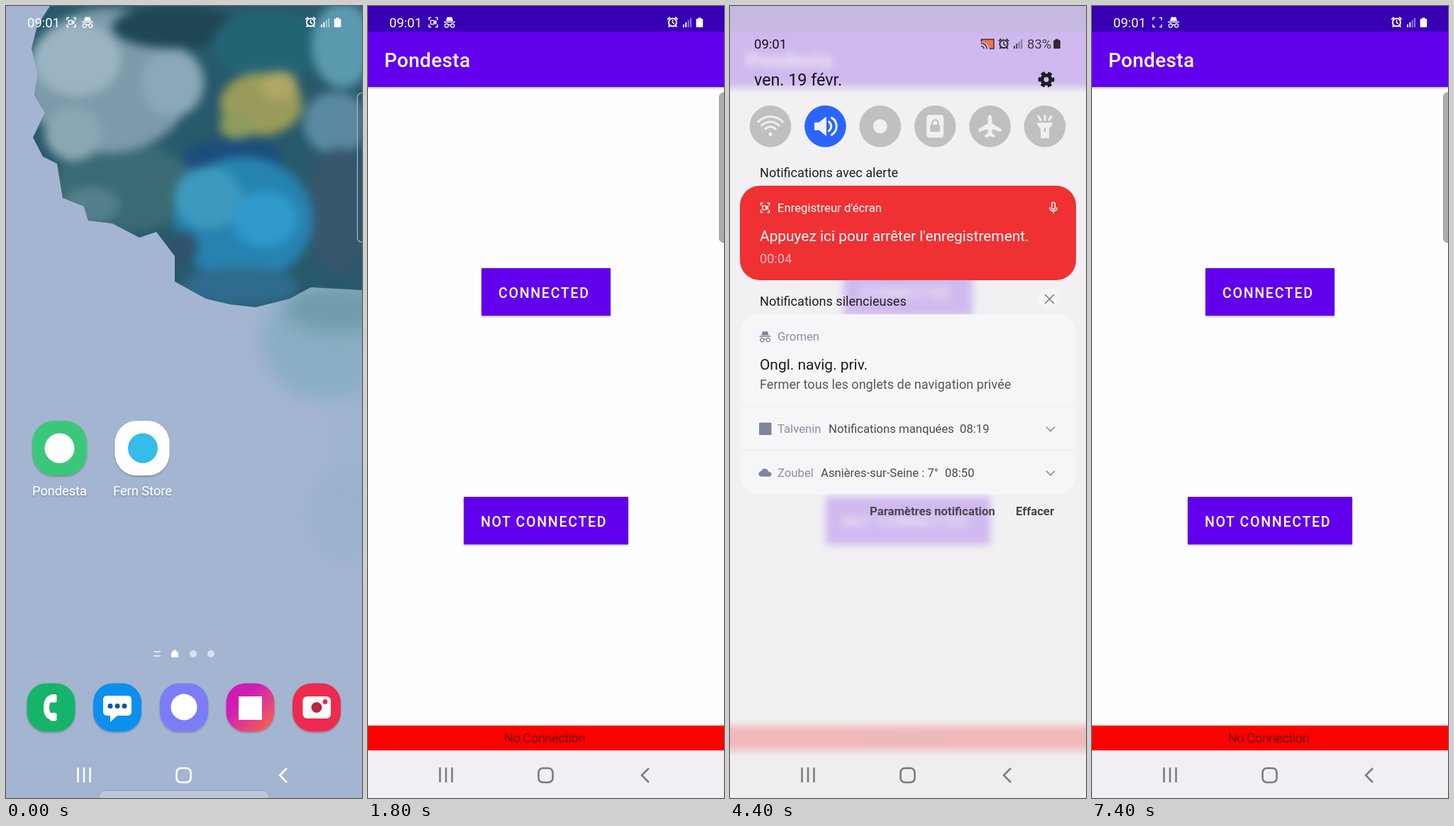
Animation of 502 by 1115 pixels, one loop 8 s. Source, as an HTML page:

```html
<!DOCTYPE html>
<html lang="fr">
<head>
<meta charset="utf-8">
<title>Pondesta</title>
<style>
html, body { margin: 0; width: 100%; height: 100%; overflow: hidden; background: #a4b5d1; }
svg { display: block; width: 502px; height: 1115px; font-family: Roboto, "Noto Sans", sans-serif; }
</style>
</head>
<body>
<svg id="stage" viewBox="0 0 502 1115" xmlns="http://www.w3.org/2000/svg"></svg>
<script>
const LOOP = 8000, STEP = 200;
const GREY = '#c2bfc2', BLUE = '#2a65ff', ICON = '#f0eff1';

// ---- markup helpers ----
const text = (x, y, size, fill, str, extra = '') =>
  `<text x="${x}" y="${y}" font-size="${size}" fill="${fill}" ${extra}>${str}</text>`;
const rect = (x, y, w, h, fill, r = 0, extra = '') =>
  `<rect x="${x}" y="${y}" width="${w}" height="${h}" rx="${r}" fill="${fill}" ${extra}/>`;
const circle = (x, y, r, fill, extra = '') =>
  `<circle cx="${x}" cy="${y}" r="${r}" fill="${fill}" ${extra}/>`;
const path = (d, fill, extra = '') => `<path d="${d}" fill="${fill}" ${extra}/>`;
const line = (d, color, w, extra = '') =>
  `<path d="${d}" fill="none" stroke="${color}" stroke-width="${w}" ${extra}/>`;
const at = (x, y, body, extra = '') => `<g transform="translate(${x} ${y})" ${extra}>${body}</g>`;
const group = (id, body, extra = '') => `<g id="${id}" ${extra}>${body}</g>`;
const blob = (x, y, rx, ry, fill, o = 1) =>
  `<ellipse cx="${x}" cy="${y}" rx="${rx}" ry="${ry}" fill="${fill}" opacity="${o}"/>`;

// ---- small icons, drawn around 0,0 ----
const brackets = c => line('M-6 -3V-6.5H-3M3 -6.5H6V-3M6 3V6.5H3M-3 6.5H-6V3', c, 1.4);
const cam = c => line('M-3.6 -2.6H1.2V2.6H-3.6ZM1.2 0L3.8 -2V2Z', c, 1.3);
const hat = c => path('M-5 -2L-3.6 -7Q-3 -8 0 -7.2Q3 -8 3.6 -7L5 -2ZM-8 -1.2H8V.3H-8Z', c) +
  line('M-6.8 4.6a2.6 2.6 0 1 0 5.2 0a2.6 2.6 0 1 0 -5.2 0M1.6 4.6a2.6 2.6 0 1 0 5.2 0a2.6 2.6 0 1 0 -5.2 0M-1.6 4Q0 3 1.6 4', c, 1.3);
const alarm = c => circle(0, 0.5, 5.6, 'none', `stroke="${c}" stroke-width="2"`) +
  line('M-7.2 -3.6L-3.6 -6.8M7.2 -3.6L3.6 -6.8M-4 5L-5.8 7M4 5L5.8 7', c, 1.9) +
  line('M0 -3V1L2.6 2.4', c, 1.5);
const signal = c => [0, 1, 2, 3].map(i =>
  rect(-6 + i * 3.4, 3 - i * 3, 1.9, 4 + i * 3, c, 0, `opacity="${i < 2 ? 1 : .5}"`)).join('');
const battery = c => rect(-4.8, -5.5, 9.6, 12, c, 1.2) + rect(-2.2, -7, 4.4, 2, c);
const mic = c => rect(-2.3, -7.5, 4.6, 9.5, 'none', 2.3, `stroke="${c}" stroke-width="1.5"`) +
  line('M-5.2 -.5Q-5.2 4.6 0 4.6Q5.2 4.6 5.2 -.5M0 4.6V8', c, 1.5);
const cast = () => path('M-8.5 -6.5H9V6.5H2A10 10 0 0 0 -8.5 -3Z', '#f0714e') +
  line('M-8.5 -3V-6.5H9V6.5H3', '#3a3a3c', 1.6) +
  line('M-9 -1A7.5 7.5 0 0 1 -1 6.8M-9 3A4 4 0 0 1 -5 6.8', '#3a3a3c', 1.6);
const gear = c => circle(0, 0, 6, 'none', `stroke="${c}" stroke-width="5"`) +
  circle(0, 0, 9.2, 'none', `stroke="${c}" stroke-width="4.4" stroke-dasharray="5.6 4.03" stroke-dashoffset="2.8"`);
const chevron = 'M-6 -3L0 3L6 -3';

const arc = r => { const d = r * .72; return `M${-d} ${11 - d}A${r} ${r} 0 0 1 ${d} ${11 - d}`; };
const tileIcons = [
  line(arc(24) + arc(17) + arc(10), ICON, 3, 'stroke-linecap="round"') + circle(0, 11, 2.6, ICON),
  path('M-15 -5H-9L1 -13V13L-9 5H-15Z', ICON, `stroke="${ICON}" stroke-linejoin="round"`) +
    line('M5 -6.5A8 8 0 0 1 5 6.5M9 -12A14 14 0 0 1 9 12', ICON, 3, 'stroke-linecap="round"'),
  circle(0, 0, 10, ICON),
  rect(-12, -16, 24, 32, ICON, 4) + rect(-7, -2, 14, 10, GREY, 1.5) + line('M-4 -2V-5A4 4 0 0 1 4 -5V-2', GREY, 2.4),
  path('M0 -16Q3 -15 3 -11V-4L16 4V8L3 4V10L7 13V16L0 14L-7 16V13L-3 10V4L-16 8V4L-3 -4V-11Q-3 -15 0 -16Z', ICON),
  path('M-11 -5H11Q10 0 6 3V17H-6V3Q-10 0 -11 -5Z', ICON) + rect(-1.3, 2, 2.6, 6, GREY, 1.3) +
    line('M0 -9V-15M-6 -9L-9 -14M6 -9L9 -14', ICON, 3, 'stroke-linecap="round"')
];

// ---- layers ----
const foliage = 'M62 0L44 28L36 60L45 95L40 125L55 150L38 185L52 212L72 222L80 270L110 282L116 302L150 306L188 326L212 318L238 352L238 388L282 412L316 420L352 424L400 412L430 396L502 400V0Z';
const wallpaper = rect(0, 0, 502, 1115, '#a4b5d1') +
  `<g filter="url(#mist)">` +
  blob(452, 470, 92, 84, '#8aaec3') + blob(470, 425, 78, 34, '#6b98a8', .8) +
  blob(500, 620, 45, 75, '#9db3cf', .8) + blob(478, 715, 54, 66, '#98b0cb', .75) + '</g>' +
  `<g clip-path="url(#leafClip)">` + rect(0, 0, 502, 440, '#28596b') + `<g filter="url(#soft)">` +
  blob(165, 255, 100, 65, '#3a6a74') + blob(120, 280, 40, 26, '#547f8b') +
  blob(145, 105, 118, 102, '#7c9aa9') + blob(100, 75, 62, 52, '#9bb4c2') + blob(235, 108, 44, 48, '#8aa8b7') + blob(95, 180, 40, 38, '#8ba7b4') +
  blob(240, 30, 90, 30, '#1f4653') + blob(370, 55, 80, 48, '#236474') +
  blob(475, 55, 44, 60, '#5b9aae') + blob(465, 165, 46, 44, '#5a89a1') +
  blob(360, 138, 58, 44, '#9a9b5b') + blob(385, 112, 26, 20, '#b1a765') + blob(325, 168, 24, 20, '#8d9c5c') +
  blob(320, 215, 70, 28, '#1c4c7c') + blob(470, 290, 48, 90, '#36566c') +
  blob(335, 300, 98, 88, '#2683b0') + blob(285, 270, 48, 44, '#3d99bd') + blob(365, 300, 46, 40, '#2f9acb') +
  blob(330, 395, 82, 28, '#2f6b8c') + blob(250, 340, 20, 24, '#31516c') +
  '</g></g>';

const squircle = (cx, cy, s, fill) => rect(cx - s / 2, cy - s / 2, s, s, fill, s * .4, 'filter="url(#lift)"');
const label = (x, str) => text(x, 689, 18.2, '#fff', str, 'text-anchor="middle" filter="url(#lift)"');
const home =
  squircle(75.5, 622.5, 77, '#3ac77a') + circle(75.5, 622.5, 21, '#fff') + label(75.5, 'Pondesta') +
  squircle(192, 622.5, 77, '#fefefe') + circle(193, 622.5, 21, '#35bce8') + label(192.5, 'Fern Store') +
  line('M208 909H218M208 915H218', '#fff', 1.8, 'opacity=".65"') +
  path('M238 906L243 910.5V917H233V910.5Z', '#fff') +
  circle(264, 912, 5, '#fff', 'opacity=".6"') + circle(289, 912, 5, '#fff', 'opacity=".6"') +
  squircle(63.5, 987.5, 68, '#17b36a') +
  line('M69 973Q57 973 57 987.5Q57 1002 69 1002', '#fff', 8) + rect(62, 969, 9.5, 11.5, '#fff', 2.5) + rect(62, 995, 9.5, 11.5, '#fff', 2.5) +
  squircle(157, 987.5, 68, '#0d8fee') + rect(137, 971, 40, 28, '#fff', 5) + path('M147 997V1008L158 998Z', '#fff') +
  [147, 157, 167].map(x => circle(x, 985.5, 3.5, '#14549c')).join('') +
  squircle(251, 987.5, 68, '#7c7df6') + circle(251, 987, 18.5, '#fff') +
  squircle(344.5, 987.5, 68, 'url(#shop)') + rect(328, 972, 33, 33, '#fff') +
  squircle(438, 987.5, 68, '#ee2a4f') + rect(418.5, 972, 39.5, 31, '#fff', 6) +
  circle(438, 987.5, 7.5, '#b8263d') + circle(450, 979.5, 3.4, '#ee2a4f') +
  rect(130.5, 1104.5, 241, 30, '#c3cddd', 9, 'opacity=".75" stroke="#8793a8"') +
  rect(495.5, 122.5, 20, 210, '#33526a', 6, 'fill-opacity=".3" stroke="#a9b8c4" stroke-width="1.2"');

const button = (x, y, w, str) => rect(x, y, w, 67, '#6200ee', 1, 'filter="url(#lift)"') +
  text(x + 24, y + 41.5, 19.5, '#fff', str, 'font-weight="500" letter-spacing="1.74"');
const app = rect(-40, -40, 582, 1200, '#fefdff') +
  rect(-40, 36, 582, 78, '#6200ee', 0, 'filter="url(#lift)"') + rect(-40, -40, 582, 76, '#3700b3') +
  text(23, 86, 27.9, '#fff', 'Pondesta', 'font-weight="500" letter-spacing=".35"') +
  button(160, 369, 182, 'CONNECTED') + button(135, 691, 232, 'NOT CONNECTED') +
  rect(-40, 1048, 582, 110, '#f1eff3') +
  group('bar', rect(-40, 1013, 582, 35, '#ff0000') +
    text(249, 1037, 18.5, '#750000', 'No Connection', 'text-anchor="middle" letter-spacing="-.6"')) +
  group('edge', rect(495.5, 122, 20, 211, '#acacac', 6, 'stroke="#9c9c9c"'));

const status = text(30, 30, 18.5, '#fff', '09:01') +
  at(92, 23, brackets('#fff') + group('recDot', cam('#fff'))) + at(115, 23, hat('#fff')) +
  at(429.5, 22.5, alarm('#fff')) + at(450, 23, signal('#fff')) + at(467.5, 23.5, battery('#fff'));

const header = text(34, 60, 18.5, '#151515', '09:01') + at(363, 53.5, cast()) +
  at(386, 53, alarm('#2b2b2d')) + at(406, 53, signal('#3a3a3c')) +
  text(419, 60, 18.5, '#3a3a3c', '83%') + at(461, 53.5, battery('#2b2b2d')) +
  text(34, 112, 23.3, '#151515', 'ven. 19 févr.') + at(446, 103.5, gear('#1e1e20'));

const tiles = tileIcons.map((icon, i) =>
  at(57 + i * 77.4, 166, circle(0, 0, 29.3, i === 1 ? BLUE : GREY, `id="tile${i}"`) + icon)).join('');

const row = (y, name, x, msg, x2, hour) => text(67, y, 16.7, '#8b8fa3', name) +
  text(x, y, 16.7, '#4b4b50', msg) + text(x2, y, 16.7, '#4b4b50', hour) +
  at(452, y - 5.5, line(chevron, '#8a8a90', 1.6));
const silent = text(42, 414, 18.1, '#1f1f21', 'Notifications silencieuses') +
  circle(450.5, 404.5, 15, '#f5f4f6') + at(450.5, 404.5, line('M-6.5 -6.5L6.5 6.5M6.5 -6.5L-6.5 6.5', '#77777b', 1.5)) +
  rect(14, 426, 474, 253, '#f6f5f8', 28) +
  at(49.5, 457.5, hat('#7f859c')) + text(67, 463, 16.7, '#8b8fa3', 'Gromen') +
  text(42, 504, 20.9, '#1c1c1e', 'Ongl. navig. priv.') +
  text(42, 531, 18.1, '#57575b', 'Fermer tous les onglets de navigation privée') +
  line('M14 556H488M14 617.5H488', '#edebef', 1.2) +
  rect(41, 578.5, 17.5, 17.5, '#7f859c', 1) + row(593, 'Talvenin', 139, 'Notifications manquées', 324, '08:19') +
  path('M44 654.5Q40 654 40.5 650Q41 647 44.5 646.5Q46 642.5 50 643.5Q53.5 644 54 647.5Q58.5 648 58.5 651.5Q58 654.5 55 654.5Z', '#7f859c') +
  row(655, 'Zoubel', 128, 'Asnières-sur-Seine : 7°', 303, '08:50') +
  text(197, 709, 16.7, '#48484c', 'Paramètres notification', 'font-weight="600"') +
  text(403, 709, 16.7, '#48484c', 'Effacer', 'font-weight="600"');

const card = rect(14, 245, 474, 133, '#ef3133', 28, 'id="cardBox"') +
  group('cardHead', text(67, 282, 16.7, '#fff', "Enregistreur d'écran") + at(456, 276, mic('#fff'))) +
  group('cardBody', at(49.5, 276, brackets('#fff') + cam('#fff')) +
    text(42, 323, 20.9, '#fff', "Appuyez ici pour arrêter l'enregistrement.") +
    text(42, 354, 18.1, '#fff', '00:04', 'id="clock" opacity=".68"'));

const nav = line('M101.5 1072V1093M110 1072V1093M118.5 1072V1093', 'currentColor', 2.5) +
  rect(240.5, 1073, 20, 20, 'none', 6, 'stroke="currentColor" stroke-width="2.6"') +
  line('M396 1073L386 1083L396 1093', 'currentColor', 2.5);

const blurFilter = (id, sd) => `<filter id="${id}" filterUnits="userSpaceOnUse" x="-40" y="-40" width="582" height="1195" color-interpolation-filters="sRGB"><feGaussianBlur stdDeviation="${sd}"/></filter>`;
document.getElementById('stage').innerHTML = `<defs>
  ${blurFilter('mist', 13)}${blurFilter('soft', 7)}${blurFilter('blur', 0)}
  <filter id="lift" x="-10%" y="-20%" width="120%" height="150%"><feDropShadow dx="0" dy="1.5" stdDeviation="1.2" flood-color="#000" flood-opacity=".28"/></filter>
  <clipPath id="leafClip">${path(foliage, '#000')}</clipPath>
  <clipPath id="winClip"><rect id="win"/></clipPath>
  <linearGradient id="shop" x1="0" y1="0" x2="1" y2="1"><stop offset=".35" stop-color="#d01fb4"/><stop offset="1" stop-color="#fb6a42"/></linearGradient>
  </defs>` +
  group('back', wallpaper + group('home', home)) +
  group('window', group('app', app), 'clip-path="url(#winClip)"') +
  rect(0, 0, 502, 1115, '#efedf0', 0, 'id="veil"') +
  group('status', status) +
  group('shade', group('header', header) + group('tiles', tiles) +
    group('alert', text(42, 233, 18.1, '#1f1f21', 'Notifications avec alerte')) +
    group('silent', silent) + group('card', card) +
    group('shelf', at(72, 315.5, hat('#a9a7ab')) + circle(97, 315.5, 2.8, '#a9a7ab')) +
    text(251, 1028, 15.4, '#9c8a8e', 'Zelu', 'id="carrier" text-anchor="middle"')) +
  group('nav', nav);

// ---- motion ----
const el = {};
document.querySelectorAll('[id]').forEach(n => el[n.id] = n);
const set = (id, attrs) => { for (const k in attrs) el[id].setAttribute(k, attrs[k]); };
const fade = (id, o) => set(id, { opacity: o, visibility: o > 0 ? 'visible' : 'hidden' });
const move = (id, y) => set(id, { transform: `translate(0 ${y})` });
const mix = (a, b, p) => a + (b - a) * p;
const clamp = v => Math.max(0, Math.min(1, v));

// Linear interpolation through [time, value] points
function key(t, ...pts) {
  if (t <= pts[0][0]) return pts[0][1];
  for (let i = 1; i < pts.length; i++) {
    const [a, va] = pts[i - 1], [b, vb] = pts[i];
    if (t <= b) return mix(va, vb, (t - a) / (b - a));
  }
  return pts[pts.length - 1][1];
}

function openWindow(t) {
  const p = key(t, [600, 0], [800, .45], [1000, .9], [1200, 1]);
  const s = mix(77, 502, p) / 502, h = mix(77, 1115, p);
  set('window', { transform: `translate(${mix(37, 0, p)} ${mix(584, 0, p)}) scale(${s})` });
  set('win', { x: 0, y: 0, width: 502, height: h / s, rx: (1 - p) * 30 / s });
  fade('window', clamp(p * 2.2));
  fade('home', 1 - p);
  fade('back', p < 1 ? 1 : 0);
  fade('bar', t >= 1400 ? 1 : 0);
  set('nav', { color: p > .95 ? '#7b7a7e' : '#fff' });
}

function pullShade(t) {
  const veil = key(t, [3000, 0], [3200, .04], [3400, .1], [3600, .2], [3800, .45], [4000, .68], [4200, .78],
    [5600, .78], [5800, .6], [6000, .3], [6200, .1], [6400, 0]);
  const show = key(t, [3000, 0], [3200, .3], [3400, .8], [3600, 1], [6000, 1], [6200, .4], [6400, 0]);
  const grow = key(t, [3600, 0], [3800, .4], [4000, .8], [4200, 1], [5600, 1], [5800, .6], [6000, .15], [6200, 0]);
  const over = key(t, [3600, 0], [4200, 8], [4400, 8], [4600, 6], [4800, 3], [5000, 0]);
  const top = over - 4 * (1 - grow);

  el.blur.firstChild.setAttribute('stdDeviation', show * 5.5);
  if (show > 0) set('app', { filter: 'url(#blur)' }); else el.app.removeAttribute('filter');
  fade('edge', 1 - show);
  fade('status', 1 - show);
  fade('veil', veil);
  el.shade.style.display = show > 0 ? '' : 'none';

  fade('header', show);
  move('header', (show - 1) * 20);
  fade('tiles', show);
  move('tiles', over * .42 + (show - 1) * 30);
  fade('alert', show * mix(.65, 1, grow));
  move('alert', top);
  fade('card', show * mix(.6, 1, grow));
  move('card', top);
  set('cardBox', { height: mix(50, 133, grow), rx: mix(25, 28, grow) });
  move('cardHead', -11 * (1 - grow));
  fade('cardBody', clamp((grow - .4) / .6));
  fade('silent', show * clamp((grow - .2) / .8));
  move('silent', over - 88 * (1 - grow));
  fade('shelf', show * clamp(1 - grow * 2));
  fade('carrier', key(t, [5400, 0], [5600, 1], [5800, .5], [6000, 0]));

  set('tile0', { fill: t >= 5000 ? BLUE : GREY });
  el.clock.textContent = '00:0' + Math.floor((t + 400) / 1000);
}

function draw(t) {
  const blink = ((t - 1780) % 1010 + 2020) % 1010;
  openWindow(t);
  pullShade(t);
  fade('recDot', blink < 520 && el.status.getAttribute('opacity') > 0 ? 1 : 0);
}

const start = performance.now();
function frame(now) {
  const t = Math.max(0, now - start) % LOOP;
  draw(Math.floor(t / STEP) * STEP);
  requestAnimationFrame(frame);
}
draw(0);
requestAnimationFrame(frame);
</script>
</body>
</html>
```
